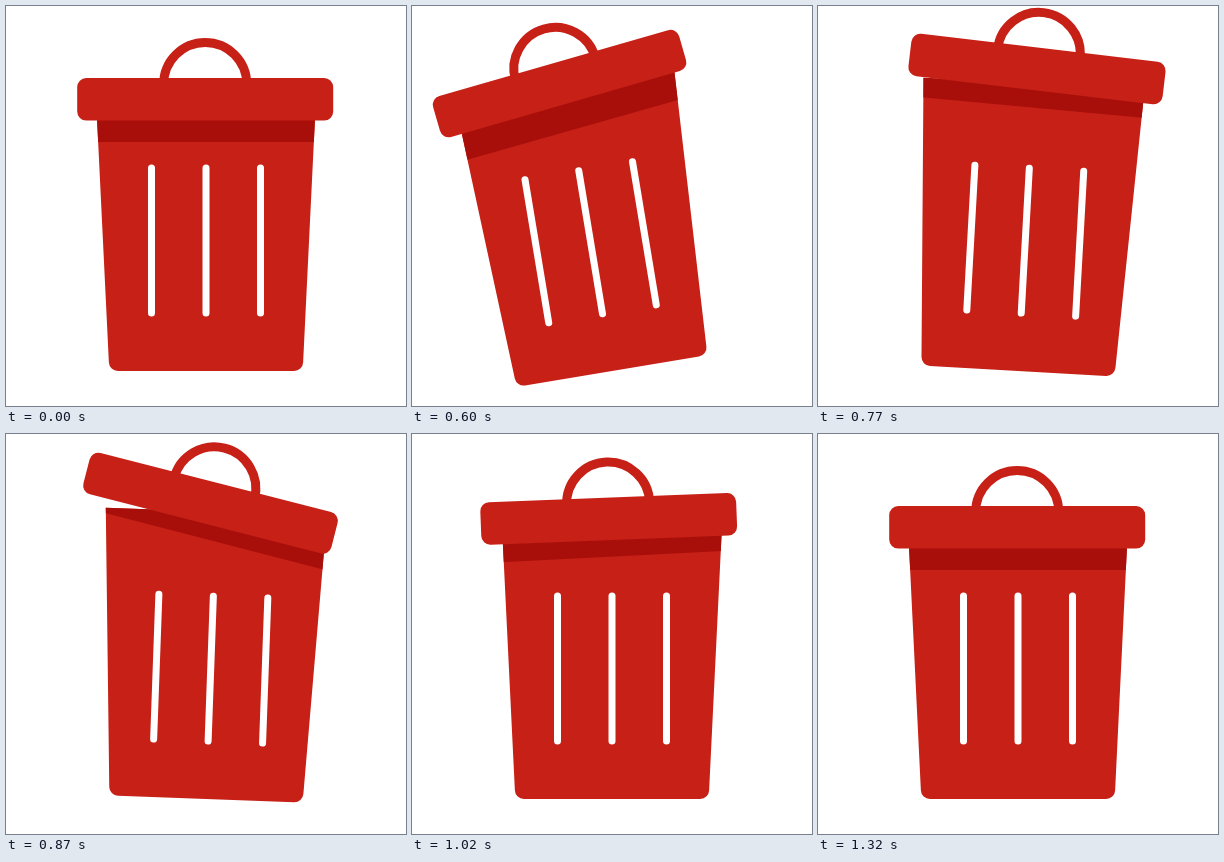
An HTML page with a canvas that plays this animation: 400 by 400 pixels, repeating every 1350 ms.

```html
<!DOCTYPE html>
<html lang="en">
<head>
<meta charset="utf-8">
<title>Trash can</title>
<style>
  html, body { margin: 0; width: 100%; height: 100%; overflow: hidden; background: #fff; }
  canvas { display: block; width: 400px; height: 400px; }
</style>
</head>
<body>
<canvas id="stage" width="400" height="400"></canvas>
<script>
const ctx = document.getElementById('stage').getContext('2d');
const RED = '#c62017', DARK = '#a90f0a';
const LOOP = 1350, STEP = 25;
const PIVOT = { x: 200, y: 365 };

const ease = {
  inOut: p => (1 - Math.cos(Math.PI * p)) / 2,
  sineOut: p => Math.sin(Math.PI * p / 2),
  powOut: p => 1 - Math.pow(1 - p, 2.4)
};

// Each key is [step, value, easing used to reach it].
const tracks = {
  bodyAngle: [[20, 0], [26, -10.15, 'powOut'], [32, 4.15], [38, 0]],
  lidAngle: [[20, 0], [26, -8.85], [35, 12.3], [41.5, -2.4], [47.5, 0.7], [53, 0]],
  lidLift: [[20, 0], [29, 31.8, 'sineOut'], [47.3, 0]],
  lidShift: [[20, 0], [26.5, -5.7], [30.8, 3], [35, -5.4], [41, -2.5], [50, 0]],
  shadeAngle: [[20, 0], [26.3, -9.1], [35.5, 12.6], [42, -3.8], [48, 0.7], [53, 0]],
  shadeLift: [[20, 0], [28.8, 35.8], [49.8, 0]]
};

function sample(keys, step) {
  if (step <= keys[0][0]) return keys[0][1];
  for (let i = 1; i < keys.length; i++) {
    const [t0, v0] = keys[i - 1];
    const [t1, v1, curve = 'inOut'] = keys[i];
    if (step <= t1) return v0 + (v1 - v0) * ease[curve]((step - t0) / (t1 - t0));
  }
  return keys[keys.length - 1][1];
}

const radians = degrees => degrees * Math.PI / 180;

function bodyPath() {
  ctx.beginPath();
  ctx.moveTo(89.3, 77.5);
  ctx.lineTo(310.7, 77.5);
  ctx.arcTo(296.7, 365, 200, 365, 9);
  ctx.arcTo(103.3, 365, 89.3, 77.5, 9);
  ctx.closePath();
}

function drawBody(pose) {
  bodyPath();
  ctx.fillStyle = RED;
  ctx.fill();

  ctx.save();
  ctx.clip();
  ctx.translate(200, 136 - pose.shadeLift);
  ctx.rotate(radians(pose.shadeAngle));
  ctx.fillStyle = DARK;
  ctx.fillRect(-200, -150, 400, 150);
  ctx.restore();

  ctx.strokeStyle = '#fff';
  ctx.lineWidth = 7;
  ctx.lineCap = 'round';
  for (const x of [145.5, 200, 254.5]) {
    ctx.beginPath();
    ctx.moveTo(x, 162);
    ctx.lineTo(x, 307);
    ctx.stroke();
  }
}

function drawLid(pose) {
  ctx.save();
  ctx.translate(199.2 + pose.lidShift, 93.3 - pose.lidLift);
  ctx.rotate(radians(pose.lidAngle));
  ctx.strokeStyle = RED;
  ctx.lineWidth = 9;
  ctx.lineCap = 'butt';
  ctx.beginPath();
  ctx.arc(0, -15.3, 41.5, Math.PI, 2 * Math.PI);
  ctx.stroke();
  ctx.fillStyle = RED;
  ctx.beginPath();
  ctx.roundRect(-128, -21.3, 256, 42.6, 9);
  ctx.fill();
  ctx.restore();
}

function draw(now) {
  const time = Math.floor((now % LOOP) / 10) * 10;
  const step = Math.floor((time + 5) / STEP);
  const pose = {};
  for (const name in tracks) pose[name] = sample(tracks[name], step);

  ctx.fillStyle = '#fff';
  ctx.fillRect(0, 0, 400, 400);
  ctx.save();
  ctx.translate(PIVOT.x, PIVOT.y);
  ctx.rotate(radians(pose.bodyAngle));
  ctx.translate(-PIVOT.x, -PIVOT.y);
  drawBody(pose);
  drawLid(pose);
  ctx.restore();
  requestAnimationFrame(draw);
}

draw(0);
</script>
</body>
</html>
```
